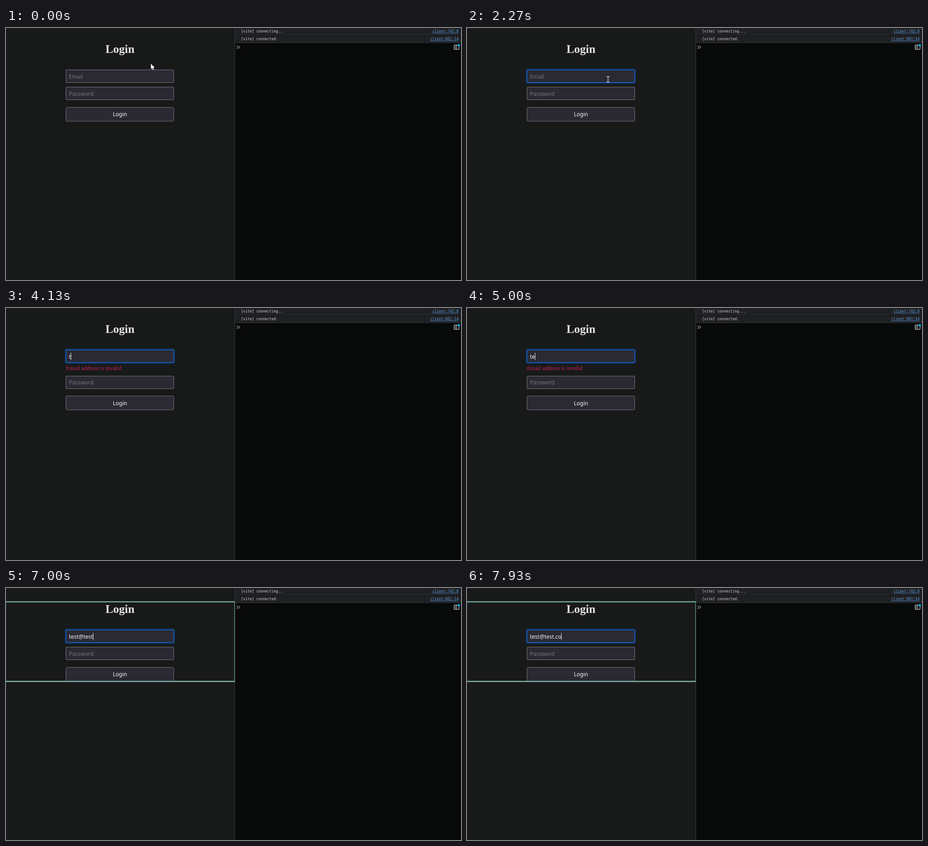
An HTML page with a canvas that plays this animation: 1005 by 557 pixels, repeating every 8 s.

```html
<!DOCTYPE html>
<html lang="en">
<head>
<meta charset="utf-8">
<title>Login form</title>
<style>
  html, body { margin: 0; width: 100%; height: 100%; overflow: hidden; background: #181a19; }
  canvas { display: block; }
</style>
</head>
<body>
<canvas id="stage" width="1005" height="557"></canvas>
<script>
const ctx = document.getElementById('stage').getContext('2d');
const LOOP = 8000;
const UI = '12px "Noto Sans", "Open Sans", sans-serif';
const MONO = '8px "DejaVu Sans Mono", monospace';
const SERIF = '"Liberation Serif", serif';
const LEFT = 132, WIDTH = 239, MID = 251.7;

// [time, value] steps; the last one reached holds
const typed = [[0, ''], [4130, 't'], [4330, 'te'], [5070, 'test'], [6070, 'test@t'],
  [6530, 'test@tes'], [6870, 'test@test'], [7400, 'test@test.'], [7800, 'test@test.c'], [7930, 'test@test.co']];
const caret = [[0, 0], [2800, 1], [3470, 0], [4130, 1], [4330, 0], [5000, 1], [5400, 0], [6070, 1]];
const invalid = [[0, 0], [4130, 1], [6870, 0], [7400, 1], [7800, 0]];
const flash = [[0, 0], [6870, 1], [7070, 0], [7400, 1], [7600, 0], [7800, 1]];
const emailState = [[0, 'idle'], [1670, 'hover'], [2270, 'focus']];
const pointer = [[0, ['arrow', 320, 79]], [70, ['arrow', 318, 85]], [133, ['arrow', 313, 123]],
  [200, ['arrow', 312, 128]], [1670, ['beam', 311.5, 113.5]], [4130, ['none', 0, 0]]];

function at(steps, t) {
  let value = steps[0][1];
  for (const [time, v] of steps) if (t >= time) value = v;
  return value;
}

function rect(x, y, w, h, color) {
  ctx.fillStyle = color;
  ctx.fillRect(x, y, w, h);
}

function text(str, x, y, font, color, align = 'left') {
  ctx.font = font;
  ctx.fillStyle = color;
  ctx.textAlign = align;
  ctx.fillText(str, x, y);
}

function path(points, color, width = 1) {
  ctx.beginPath();
  points.forEach(([x, y]) => ctx.lineTo(x, y));
  ctx.strokeStyle = color;
  ctx.lineWidth = width;
  ctx.stroke();
}

function box(x, y, w, h, r, fill, stroke, line = 1) {
  ctx.beginPath();
  ctx.roundRect(x, y, w, h, r);
  if (fill) {
    ctx.fillStyle = fill;
    ctx.fill();
  }
  ctx.strokeStyle = stroke;
  ctx.lineWidth = line;
  ctx.stroke();
}

function field(y, h, state = 'idle', radius = 1.5) {
  if (state === 'focus') {
    box(LEFT - 0.5, y - 0.5, WIDTH + 1, h + 1, 3, null, 'rgba(0, 96, 223, 0.3)', 3.5);
    box(LEFT + 0.5, y + 0.5, WIDTH - 1, h - 1, 2, '#2b2a33', '#1069d8', 1.4);
  } else {
    box(LEFT + 0.5, y + 0.5, WIDTH - 1, h - 1, radius, '#2b2a33', state === 'hover' ? '#5c5c68' : '#777783');
  }
}

function consoleRow(y, message, link) {
  rect(506, y - 10, 499, 15, '#1f2023');
  rect(506, y + 5, 499, 1, '#36373a');
  text(message, 519, y, MONO, '#d0d0d3');
  text(link, 999.5, y, MONO, '#5b9ddd', 'right');
  const w = ctx.measureText(link).width;
  rect(999.5 - w, y + 1, w, 1, '#457aae');
}

function consolePane() {
  rect(506, 0, 499, 557, '#080a09');
  consoleRow(10, '[vite] connecting...', 'client:742:8');
  consoleRow(27, '[vite] connected.', 'client:861:14');
  rect(505, 0, 1, 557, '#3a3b3d');
  for (const x of [509, 513]) path([[x, 39], [x + 3.5, 42.5], [x, 46]], '#929296', 1.1);
  box(989.7, 37.7, 11, 9.6, 2, null, '#d2d2d4', 1.2);
  rect(991.5, 39.5, 2.5, 6, '#5c5c5f');
  rect(994.5, 38, 1, 9, '#d2d2d4');
  ctx.beginPath();
  ctx.arc(1000.3, 38, 2.6, 0, Math.PI * 2);
  ctx.fillStyle = '#00b3f0';
  ctx.fill();
}

function outline(bottom, bright) {
  rect(0, 32, 1, bottom - 32, '#24302e');
  rect(504, 30, 1.5, bottom - 30, '#54857c');
  rect(0, 29, 505.5, 3, '#5d8d84');
  rect(0, 30, 505.5, 1, '#6fa499');
  rect(0, bottom - 1, 505.5, 3, bright ? '#7fada4' : '#5d8d84');
  rect(0, bottom, 505.5, 1, bright ? '#b5d5ce' : '#8fbdb3');
}

function drawPointer([kind, x, y]) {
  if (kind === 'arrow') {
    ctx.beginPath();
    [[0, 0], [0, 12], [2.7, 9.6], [4.6, 14], [6.7, 13], [4.9, 8.8], [8.5, 8.6]]
      .forEach(([dx, dy]) => ctx.lineTo(x + dx, y + dy));
    ctx.closePath();
    ctx.strokeStyle = '#0b0b0b';
    ctx.lineWidth = 1;
    ctx.stroke();
    ctx.fillStyle = '#fff';
    ctx.fill();
  } else if (kind === 'beam') {
    path([[x, y - 6], [x, y + 6]], '#e2e2e4', 1.2);
    for (const dy of [-6, 6]) path([[x - 3.5, y + dy], [x + 3.5, y + dy]], '#e2e2e4', 1.2);
  }
}

function draw(t) {
  const value = at(typed, t), bad = at(invalid, t);
  const drop = bad ? 19.5 : 0;

  rect(0, 0, 506, 557, '#181a19');
  text('Login', MID, 55, `bold 25.6px ${SERIF}`, '#e8e6e3', 'center');

  field(92, 29, at(emailState, t));
  text(value || 'Email', 139, 111.5, UI, value ? '#f4f4f6' : '#75747b');
  if (at(caret, t)) {
    const w = value ? ctx.measureText(value).width : 0;
    rect(Math.round(139 + w), 99, 1, 16, '#e4e4e6');
  }
  if (bad) text('Email address is invalid', 132.5, 137, `12.8px ${SERIF}`, '#cf2150');

  field(Math.round(130 + drop), 29);
  text('Password', 139, 149.5 + drop, UI, '#75747b');
  field(Math.round(174.6 + drop), 31.5, 'idle', 3);
  text('Login', MID, 195 + drop, UI, '#fbfbfe', 'center');

  consolePane();
  if (at(flash, t)) outline(bad ? 225 : 206, bad);
  drawPointer(at(pointer, t));
}

const start = performance.now();
function tick() {
  draw((performance.now() - start) % LOOP);
  requestAnimationFrame(tick);
}
tick();
</script>
</body>
</html>
```
